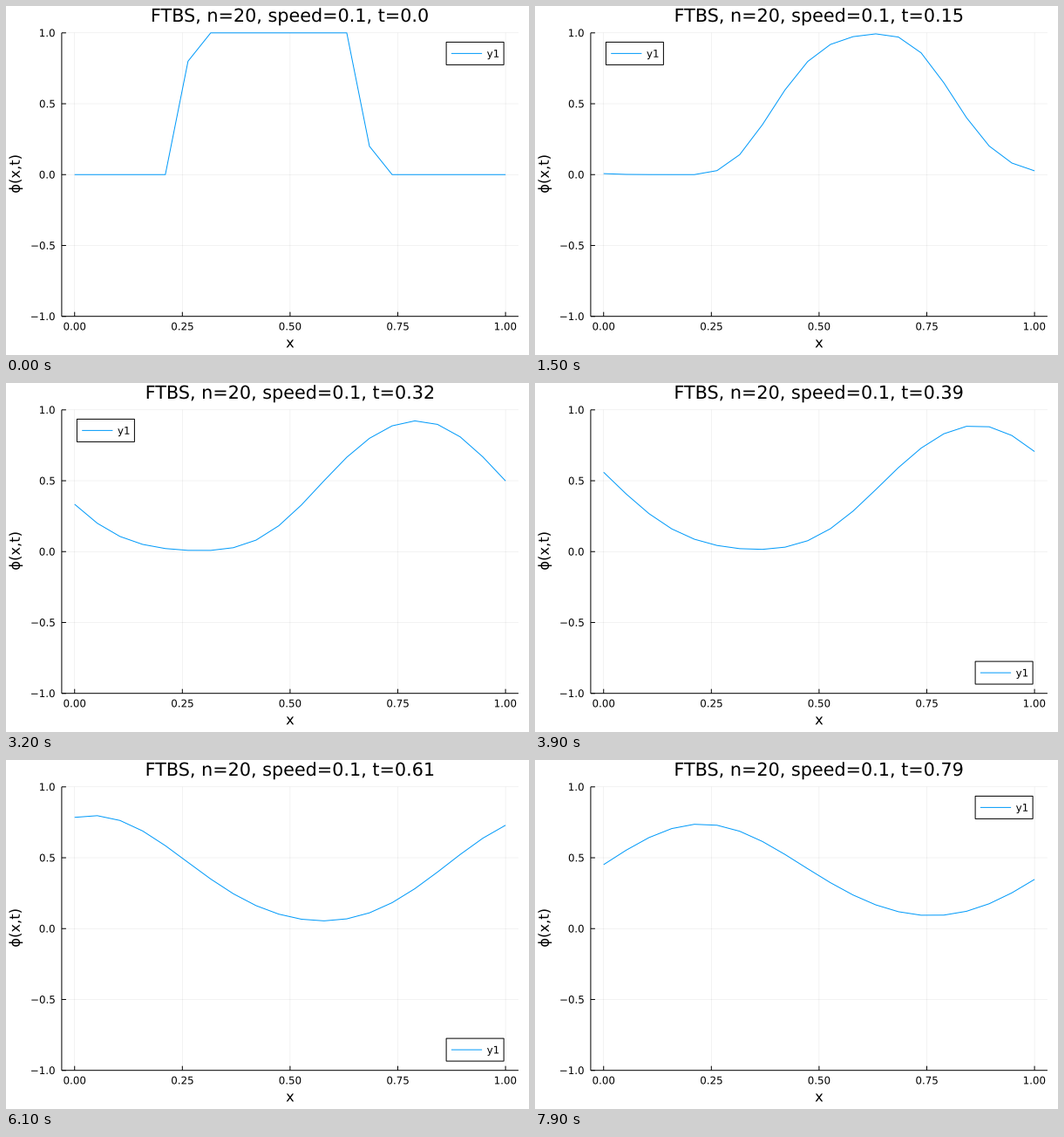
Animation of 600x400 px, one loop 8000 ms. Source, as a matplotlib script:

```python
import numpy as np
import matplotlib.pyplot as plt
from matplotlib.animation import FuncAnimation
from matplotlib.patches import PathPatch, Rectangle
from matplotlib.textpath import TextPath
from matplotlib.transforms import Affine2D

plt.rcParams["font.family"] = "DejaVu Sans"

W, H, DPI = 600, 400, 100
FRAMES, INTERVAL = 80, 100
N, COURANT = 20, 0.2
PT = 72 / DPI  # points per pixel

LEFT, RIGHT, TOP, BOTTOM = 63.9, 587.9, 30.8, 355.7
XLIM, YLIM = (-0.03, 1.03), (-1.0, 1.0)
BLUE, GRID = "#009afa", (0, 0, 0, 0.1)
TITLE, GUIDE, TICK = 20.74, 16.3, 11.85  # font sizes in pixels
HALF_CAP = 0.365 * TICK


def px(x):
    return LEFT + (x - XLIM[0]) / (XLIM[1] - XLIM[0]) * (RIGHT - LEFT)


def py(y):
    return BOTTOM - (y - YLIM[0]) / (YLIM[1] - YLIM[0]) * (BOTTOM - TOP)


def solve():
    """Upwind advection of a square pulse on a periodic grid."""
    phi = np.zeros(N)
    phi[5:13] = 1
    rows = []
    for _ in range(FRAMES):
        phi = phi - COURANT * (phi - np.roll(phi, 1))
        rows.append(phi)
    return rows


x = np.linspace(0, 1, N)
states = solve()

fig = plt.figure(figsize=(W / DPI, H / DPI), dpi=DPI, facecolor="white")
ax = fig.add_axes([0, 0, 1, 1])
ax.set_xlim(0, W)
ax.set_ylim(H, 0)
ax.axis("off")


def line(xs, ys, color="black", width=1.0, z=2):
    return ax.plot(xs, ys, color=color, lw=width * PT, zorder=z, snap=False,
                   solid_capstyle="butt", solid_joinstyle="round")[0]


def outline(x, y, s, size, align=0.5, angle=0):
    """Text outline on baseline y; align 0, 0.5, 1 = left, centre, right."""
    path = TextPath((0, 0), s, size=size)
    ext = path.get_extents()
    shift = -(ext.x0 + align * ext.width)
    place = Affine2D().translate(shift, 0).scale(1, -1)
    return path.transformed(place.rotate_deg(-angle).translate(x, y))


def label(*args, z=3, **kw):
    return ax.add_patch(PathPatch(outline(*args, **kw), fc="black", lw=0,
                                  snap=False, zorder=z))


# Grid, ticks and axes
for v in np.linspace(0, 1, 5):
    u = px(v)
    line([u, u], [TOP, BOTTOM], GRID, 0.5, 1)
    line([u, u], [BOTTOM, BOTTOM - 5])
    label(u, 371.4, f"{v:.2f}", TICK)
for v in np.linspace(-1, 1, 5):
    u = py(v)
    line([LEFT, RIGHT], [u, u], GRID, 0.5, 1)
    line([LEFT, LEFT + 5], [u, u])
    label(55.8, u + HALF_CAP, f"{v:.1f}".replace("-", "\u2212"), TICK, 1)
line([LEFT, LEFT], [TOP, BOTTOM])
line([LEFT, RIGHT], [BOTTOM, BOTTOM])

mid = (LEFT + RIGHT) / 2
label(mid, 391.4, "x", GUIDE)
label(15.8, 192.6, "\u03d5(x,t)", GUIDE, angle=90)
title = label(mid, 18, "t", TITLE)
curve = line(px(x), py(states[0]), BLUE, z=4)

# Legend
BOX_W, BOX_H = 66, 26
box = ax.add_patch(Rectangle((0, 0), BOX_W, BOX_H, fc="white", ec="black",
                             lw=PT, snap=False, zorder=5))
key = line([0, 0], [0, 0], BLUE, z=6)
name = label(0, 0, "y1", TICK, z=6)


def legend_corner(phi):
    """First free corner: top right, top left, then bottom right."""
    high = phi >= 0.5
    if not high[x >= 0.765].any():
        return 505.1, 41.4
    if not high[x <= 0.235].any():
        return 81.4, 41.4
    return 505.1, 319.1


def update(k):
    phi = states[k]
    curve.set_ydata(py(phi))
    text = f"FTBS, n=20, speed=0.1, t={round(k / 100, 2)}"
    title.set_path(outline(mid, 18, text, TITLE))
    bx, by = legend_corner(phi)
    cy = by + BOX_H / 2
    box.set_xy((bx, by))
    key.set_data([bx + 5.8, bx + 41], [cy, cy])
    name.set_path(outline(bx + 46.9, cy + HALF_CAP, "y1", TICK, 0))
    return curve, title, box, key, name


anim = FuncAnimation(fig, update, frames=FRAMES, interval=INTERVAL,
                     repeat=True, repeat_delay=0, blit=False)
plt.show()
```
